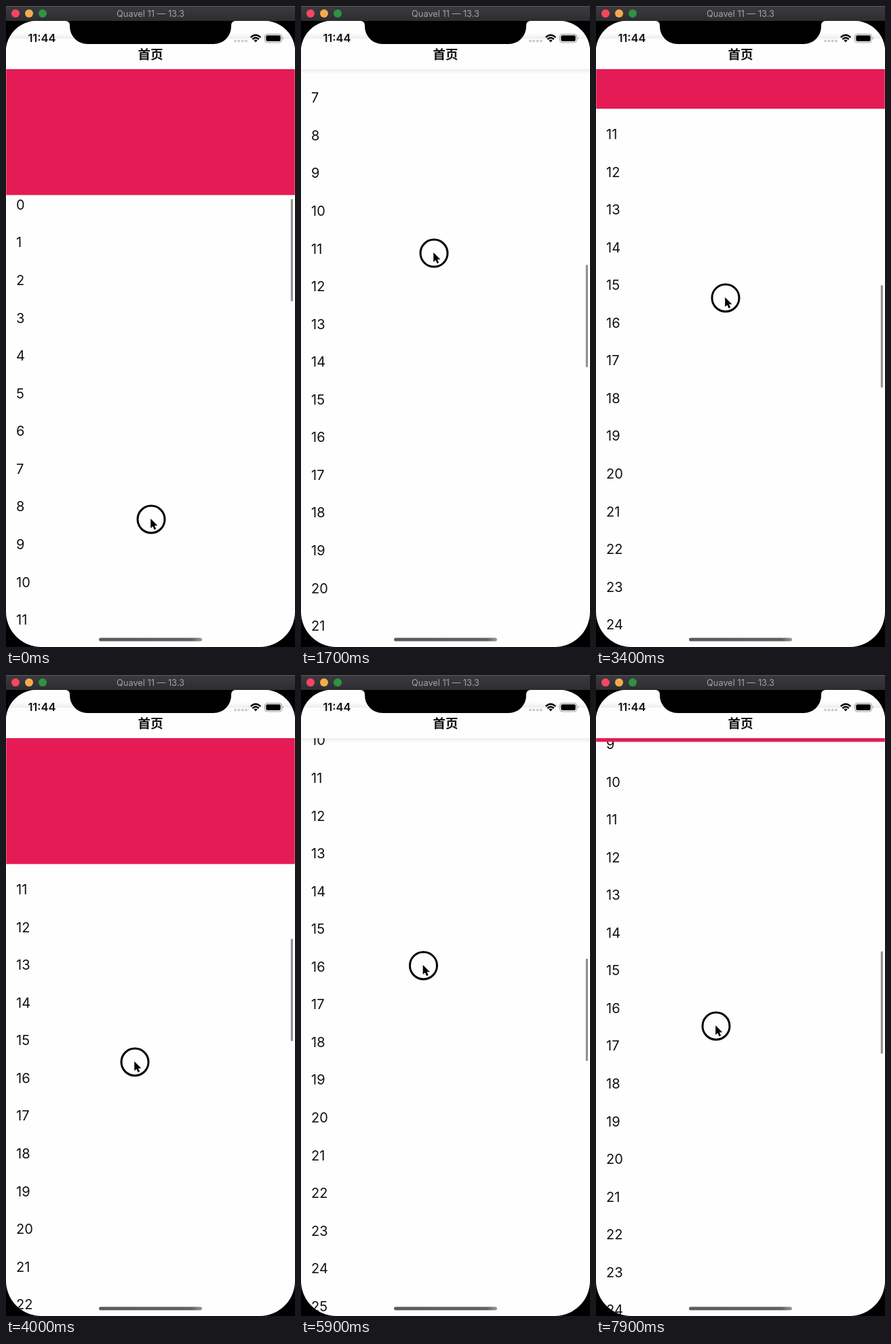
An HTML page that plays this animation: 426x944 px, repeating every 8000 ms.

```html
<!DOCTYPE html>
<html lang="zh">
<head>
<meta charset="utf-8">
<style>
html, body { margin: 0; width: 100%; height: 100%; overflow: hidden; background: #000; }
svg { display: block; width: 100vw; height: 100vh; font-family: Inter, "Noto Sans CJK SC", "Noto Sans CJK", sans-serif; }
</style>
</head>
<body>
<svg viewBox="0 0 426 944">
  <defs>
    <clipPath id="screen"><path d="M45 22H381a45 45 0 0 1 45 45V892a52 52 0 0 1-52 52H52a52 52 0 0 1-52-52V67a45 45 0 0 1 45-45z"/></clipPath>
    <linearGradient id="bar" x2="0" y2="1"><stop stop-color="#3c3c40"/><stop offset="1" stop-color="#2d2d31"/></linearGradient>
    <linearGradient id="above" x2="0" y2="1"><stop stop-color="#000" stop-opacity="0"/><stop offset="1" stop-color="#000" stop-opacity=".07"/></linearGradient>
    <linearGradient id="below" x2="0" y2="1"><stop stop-color="#000" stop-opacity=".07"/><stop offset="1" stop-color="#000" stop-opacity="0"/></linearGradient>
    <linearGradient id="home"><stop stop-color="#5c5a5c"/><stop offset=".9" stop-color="#626062"/><stop offset="1" stop-color="#999"/></linearGradient>
  </defs>

  <rect width="426" height="944"/>
  <g clip-path="url(#screen)">
    <rect y="22" width="426" height="922" fill="#fefefe"/>
    <g id="rows" font-size="20" fill="#111"></g>
    <rect y="93" width="426" height="7" fill="url(#below)"/>
    <rect id="header" x=".3" y="93" width="425.4" fill="#e41b54"/>
    <rect y="22" width="426" height="71" fill="#fefefe"/>
    <rect y="40" width="426" height="8" fill="url(#above)"/>
    <text x="213" y="77.5" font-size="18.5" font-weight="700" text-anchor="middle" fill="#111">首页</text>
    <text x="53" y="53" font-size="16.5" font-weight="600" text-anchor="middle" fill="#111">11:44</text>
    <g fill="#cfcacf"><circle cx="338" cy="51.5" r="2"/><circle cx="343.3" cy="51.5" r="2"/><circle cx="348.6" cy="51.5" r="2"/><circle cx="353.9" cy="51.5" r="2"/></g>
    <g fill="none" stroke="#000" stroke-width="2.4">
      <path d="M360.7 46.2Q368 39.2 375.3 46.2M363.3 49Q368 44.6 372.7 49"/>
      <path d="M365.4 50.6Q368 48.6 370.6 50.6L368 53.4Z" fill="#000" stroke="none"/>
    </g>
    <rect x="381.5" y="41.5" width="25" height="12.4" rx="3.6" fill="none" stroke="#999"/>
    <rect x="383.3" y="43.3" width="21.4" height="8.8" rx="2"/>
    <path d="M408 45.6q2 2 0 4.2z" fill="#999"/>
    <path d="M88 22a6 6 0 0 1 6 6v2a26 26 0 0 0 26 26h186a26 26 0 0 0 26-26v-2a6 6 0 0 1 6-6z"/>
    <rect id="thumb" x="419.8" width="3.1" height="151" rx="1.5" fill="#8f8f8f"/>
    <rect id="pill" x="137" y="930.5" width="152" height="5" rx="2.5"/>
  </g>

  <rect width="426" height="22" fill="url(#bar)"/>
  <rect width="426" height="1" fill="#58585c"/>
  <circle cx="14" cy="11" r="6" fill="#fb4560"/>
  <circle cx="34" cy="11" r="6" fill="#f4ab4e"/>
  <circle cx="54" cy="11" r="6" fill="#2f9340"/>
  <text x="213" y="16" font-size="12.8" text-anchor="middle" fill="#a2a2a5">Quavel 11 — 13.3</text>

  <g id="pointer">
    <circle r="20" fill="none" stroke="#000" stroke-width="3"/>
    <path d="M-.8-1V13L2.4 10.2 4.6 15.2 7.2 14 5 9.2H9.4Z" stroke="#fff" paint-order="stroke"/>
  </g>
</svg>
<script>
const $ = id => document.getElementById(id);
const LOOP = 8000, STEP = 100, ROW = 55.56, MAX = 185;

// time (s), scroll offset; every change of direction is a key
const scrollKeys = [[0, 0], [.65, 356], [.9, 245.5], [1, 235], [1.8, 580], [2.8, 750], [2.95, 773], [4, 588],
  [4.75, 506], [5.2, 549], [6.05, 767], [6.6, 651], [7.15, 511], [7.9, 691], [8.1, 720]];
// pointer height plus scroll offset, and pointer x
const gripKeys = [[0, 756], [.9, 749.5], [2.8, 1132], [4, 1158], [5.2, 1140], [6.6, 1220], [7.9, 1208], [8.1, 1208]];
const xKeys = [[0, 214], [.9, 199], [2.8, 192], [4, 190], [5.2, 180], [6.6, 181], [7.9, 177], [8.1, 177]];

const segment = (keys, t) => Math.max(1, keys.findIndex(k => k[0] > t)) - 1;
const clamp = h => Math.min(MAX, Math.max(0, h));

function linear(keys, t) {
  const i = segment(keys, t), [a, p] = keys[i], [b, q] = keys[i + 1];
  return p + (q - p) * (t - a) / (b - a);
}

// slope of a monotone cubic: flat at every turn
function slope(keys, i) {
  if (!i || i === keys.length - 1) return 0;
  const rate = j => (keys[j + 1][1] - keys[j][1]) / (keys[j + 1][0] - keys[j][0]);
  const a = rate(i - 1), b = rate(i);
  return a * b > 0 ? 2 * a * b / (a + b) : 0;
}

function smooth(keys, t) {
  const i = segment(keys, t), [a, p] = keys[i], [b, q] = keys[i + 1];
  const d = b - a, u = (t - a) / d, v = 1 - u;
  return p * v * v * (1 + 2 * u) + q * u * u * (3 - 2 * u)
    + d * u * v * (slope(keys, i) * v - slope(keys, i + 1) * u);
}

// the header shrinks with forward scroll and grows with backward scroll
function headerHeight(t, scroll) {
  let h = MAX, last = 0;
  for (const [time, s] of scrollKeys) {
    if (time > t) break;
    h = clamp(h - s + last);
    last = s;
  }
  return clamp(h - scroll + last);
}

for (let i = 0; i < 32; i++) {
  const row = document.createElementNS("http://www.w3.org/2000/svg", "text");
  row.setAttribute("x", 15);
  row.setAttribute("y", 299.9 + i * ROW);
  row.textContent = i;
  $("rows").append(row);
}

function draw(now) {
  const t = Math.floor(now % LOOP / STEP) * STEP / 1000;
  const scroll = smooth(scrollKeys, t), height = headerHeight(t, scroll);
  $("rows").setAttribute("transform", `translate(0 ${-scroll})`);
  $("header").setAttribute("height", height && height + .4);
  $("thumb").setAttribute("y", 284 + scroll * .1775);
  $("pill").setAttribute("fill", t > .3 && t < 1.5 ? "#000" : "url(#home)");
  $("pointer").setAttribute("transform", `translate(${linear(xKeys, t)} ${linear(gripKeys, t) - scroll})`);
}

const start = performance.now();
function tick() {
  draw(performance.now() - start);
  requestAnimationFrame(tick);
}
tick();
</script>
</body>
</html>
```
